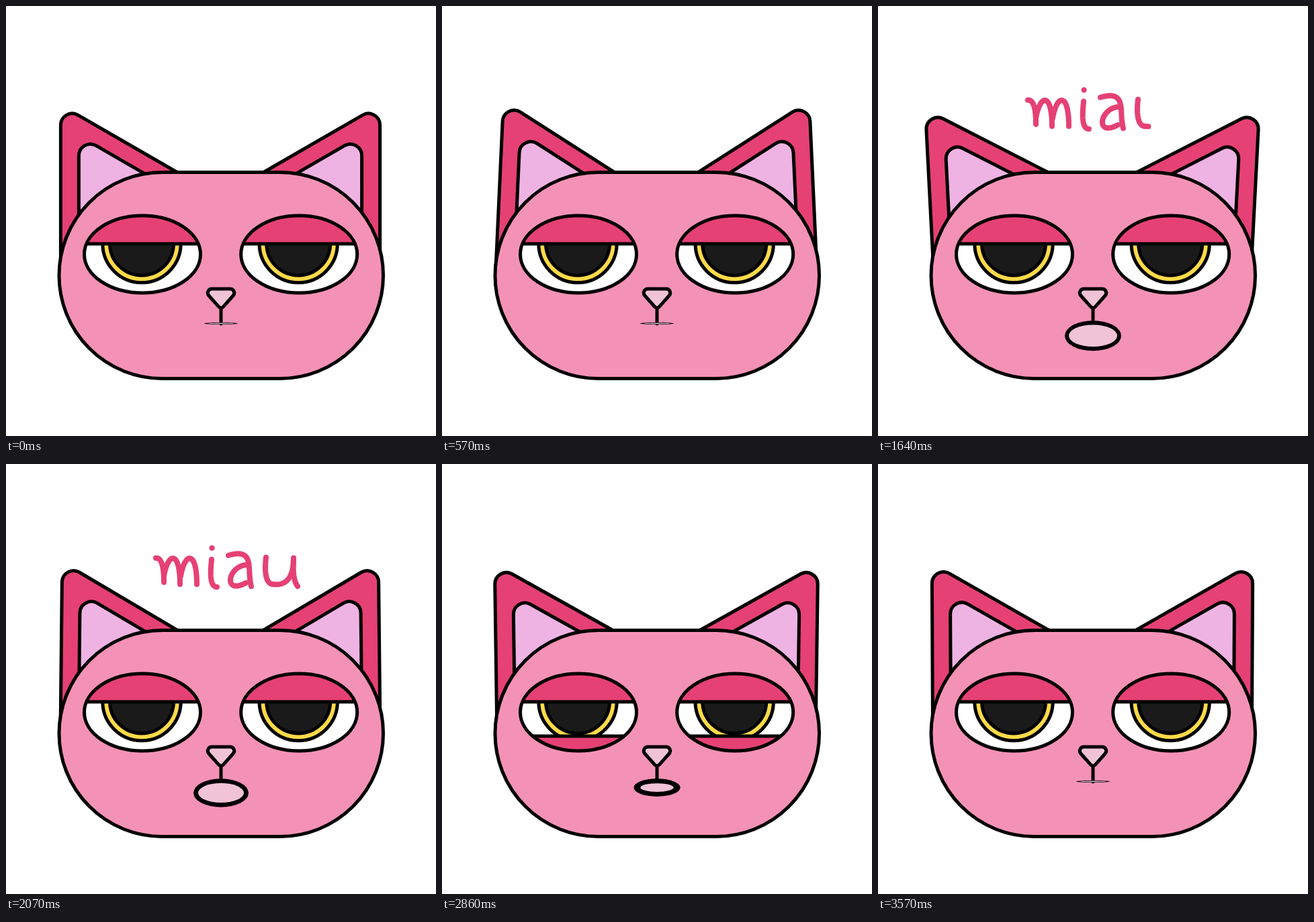
Animation, 640 px wide and 640 px high, one loop 3.64 s. Source, as an HTML page with a canvas:

```html
<!DOCTYPE html>
<html lang="en">
<head>
<meta charset="utf-8">
<title>Grumpy cat</title>
<style>
  html, body { margin: 0; width: 100%; height: 100%; overflow: hidden; background: #fff; }
  canvas { display: block; width: 640px; height: 640px; }
</style>
</head>
<body>
<canvas id="stage" width="640" height="640"></canvas>
<script>
const ctx = document.getElementById('stage').getContext('2d');
const LOOP = 3640, STEPS = 51, TAU = Math.PI * 2;
const ROSE = '#e54174', SKIN = '#f492b5', LILAC = '#eeb3e2', PALE = '#f0c3d5';
const YELLOW = '#ffda48', DARK = '#1a1a1a';

const progress = (s, from, to) => Math.min(1, Math.max(0, (s - from) / (to - from)));
const ease = (p) => (1 - Math.cos(Math.PI * p)) / 2;
const mix = (a, b, p) => a + (b - a) * p;

// Ears swing in and out between turning points, at rest at both ends of the loop
function earAngle(s) {
  const turns = [0, 10.2, 22.9, 33.7, 44.4, 51.5];
  const last = turns.length - 1;
  const pose = (i) => (i === 0 || i === last ? 0 : i % 2 ? 2.95 : -2.95);
  const i = turns.findIndex((turn) => s < turn);
  return mix(pose(i - 1), pose(i), ease(progress(s, turns[i - 1], turns[i])));
}

const blink = (s, middle) => ease(1 - Math.min(1, Math.abs(s - middle) / 3));
const lowerLid = (s) => mix(432, 354, Math.max(blink(s, 4), blink(s, 41.8)));

function mouthHeight(s) {
  const open = s < 24 ? ease(progress(s, 10, 22)) : 1 - progress(s, 24, 50) ** 1.7;
  return mix(1.5, 22.5, open);
}

function paint(fill, width = 5) {
  if (fill) { ctx.fillStyle = fill; ctx.fill(); }
  if (width) { ctx.lineWidth = width; ctx.strokeStyle = '#000'; ctx.stroke(); }
}

function oval(x, y, rx, ry = rx) {
  ctx.beginPath();
  ctx.ellipse(x, y, rx, ry, 0, 0, TAU);
}

function line(x0, y0, x1, y1) {
  ctx.beginPath();
  ctx.moveTo(x0, y0);
  ctx.lineTo(x1, y1);
  paint(null);
}

// Wedge with a rounded 60 degree tip; its lower end hides behind the head
function earShape(x, apexY, reach, fill) {
  const right = x + reach, slopeEnd = apexY + reach * Math.tan(Math.PI / 6);
  ctx.beginPath();
  ctx.moveTo(x, 400);
  ctx.arcTo(x, apexY, right, slopeEnd, 17.2);
  ctx.lineTo(right, slopeEnd);
  ctx.lineTo(right, 400);
  ctx.closePath();
  paint(fill);
}

function ear(angle) {
  ctx.save();
  ctx.translate(208, 365);
  ctx.rotate(angle * Math.PI / 180);
  ctx.translate(-208, -365);
  earShape(81.4, 147.4, 195, ROSE);
  earShape(108.4, 193, 130, LILAC);
  ctx.restore();
}

function ears(angle) {
  ear(angle);
  ctx.save();
  ctx.translate(638, 0);
  ctx.scale(-1, 1);
  ear(angle);
  ctx.restore();
}

function head() {
  ctx.beginPath();
  ctx.arc(232.5, 401, 153.5, Math.PI / 2, Math.PI * 1.5);
  ctx.arc(408, 401, 153.5, -Math.PI / 2, Math.PI / 2);
  ctx.closePath();
  paint(SKIN);
}

function eye(x, lidY) {
  ctx.save();
  oval(x, 369.5, 86.5, 57.5);
  paint('#fff', 0);
  ctx.clip();
  oval(x - 1, 353.5, 58.2);
  paint(YELLOW);
  oval(x - 1, 353.5, 47.5);
  paint(DARK);
  ctx.fillStyle = ROSE;
  ctx.fillRect(x - 90, 300, 180, 54);
  ctx.fillRect(x - 90, lidY, 180, 440 - lidY);
  line(x - 90, 354, x + 90, 354);
  line(x - 90, lidY, x + 90, lidY);
  ctx.restore();
  oval(x, 369.5, 86.5, 57.5);
  paint(null);
}

function nose() {
  line(320, 449, 320, 473);
  ctx.beginPath();
  ctx.moveTo(320, 421);
  ctx.arcTo(347, 421, 320, 451.5, 6);
  ctx.arcTo(320, 451.5, 293, 421, 4.5);
  ctx.arcTo(293, 421, 320, 421, 6);
  ctx.closePath();
  paint(PALE);
}

// The lip is thickest while the mouth is half open
function mouth(h) {
  const w = 24 + 0.8 * h;
  const y = 471.4 - 0.26 * Math.min(h, 12) + h;
  const side = 10 - 0.036 * (h - 12) ** 2;
  const rim = Math.max(0.7, 7.3 - 0.03 * (h - 16.5) ** 2);
  oval(320, y, w, h);
  paint('#000', 0);
  oval(320, y, w - side, Math.max(0.4, h - rim));
  paint(PALE, 0);
}

// Samples a cubic pen stroke into short segments
function curve(x0, y0, x1, y1, x2, y2, x3, y3) {
  const bend = (a, b, c, d, t) =>
    mix(mix(mix(a, b, t), mix(b, c, t), t), mix(mix(b, c, t), mix(c, d, t), t), t);
  return Array.from({ length: 25 }, (_, i) =>
    [bend(x0, x1, x2, x3, i / 24), bend(y0, y1, y2, y3, i / 24)]);
}

const hump = (x) => curve(x, 167, x + 6, 131, x + 24, 128, x + 24, 179);
const dot = (x, y) => [[x, y], [x + 0.1, y]];

// Handwritten "miau", in writing order
const WORD = [
  curve(223, 140, 233, 139, 235, 158, 235, 176), hump(235), hump(260),
  curve(306, 142, 304, 162, 303, 183, 314, 183), dot(306.5, 125),
  curve(331, 136, 372, 124, 358, 158, 365, 182),
  curve(360, 150, 330, 150, 322, 196, 357, 177),
  curve(387, 139, 384, 165, 388, 178, 397, 179),
  curve(397, 179, 420, 182, 428, 165, 428, 140),
  curve(428, 140, 427, 160, 428, 174, 434, 182)
];

const gap = (p, q) => Math.hypot(q[0] - p[0], q[1] - p[1]);
const strokeLength = (pts) => pts.slice(1).reduce((sum, p, i) => sum + gap(pts[i], p), 0);
const WORD_LENGTH = WORD.reduce((sum, pts) => sum + strokeLength(pts), 0);

function word(s) {
  const scale = 1 - ease(progress(s, 31.4, 35.8));
  let left = WORD_LENGTH * progress(s, 15.5, 24.7);
  if (left <= 0 || scale <= 0) return;
  ctx.save();
  ctx.translate(348, 180);
  ctx.scale(scale, scale);
  ctx.translate(-348, -180);
  ctx.lineWidth = 8;
  ctx.strokeStyle = ROSE;
  for (const pts of WORD) {
    if (left <= 0) break;
    ctx.beginPath();
    ctx.moveTo(...pts[0]);
    for (let i = 1; i < pts.length && left > 0; i++) {
      const [p, q] = [pts[i - 1], pts[i]], d = gap(p, q), k = Math.min(1, left / d);
      ctx.lineTo(mix(p[0], q[0], k), mix(p[1], q[1], k));
      left -= d;
    }
    ctx.stroke();
  }
  ctx.restore();
}

function draw(s) {
  ctx.fillStyle = '#fff';
  ctx.fillRect(0, 0, 640, 640);
  ctx.lineCap = ctx.lineJoin = 'round';
  ears(earAngle(s));
  head();
  eye(203, lowerLid(s));
  eye(436.2, lowerLid(s));
  nose();
  mouth(mouthHeight(s));
  word(s);
}

const start = performance.now();
function tick() {
  const t = (performance.now() - start) % LOOP;
  draw(Math.floor((t + 4) * STEPS / LOOP) % STEPS);
  requestAnimationFrame(tick);
}
tick();
</script>
</body>
</html>
```
